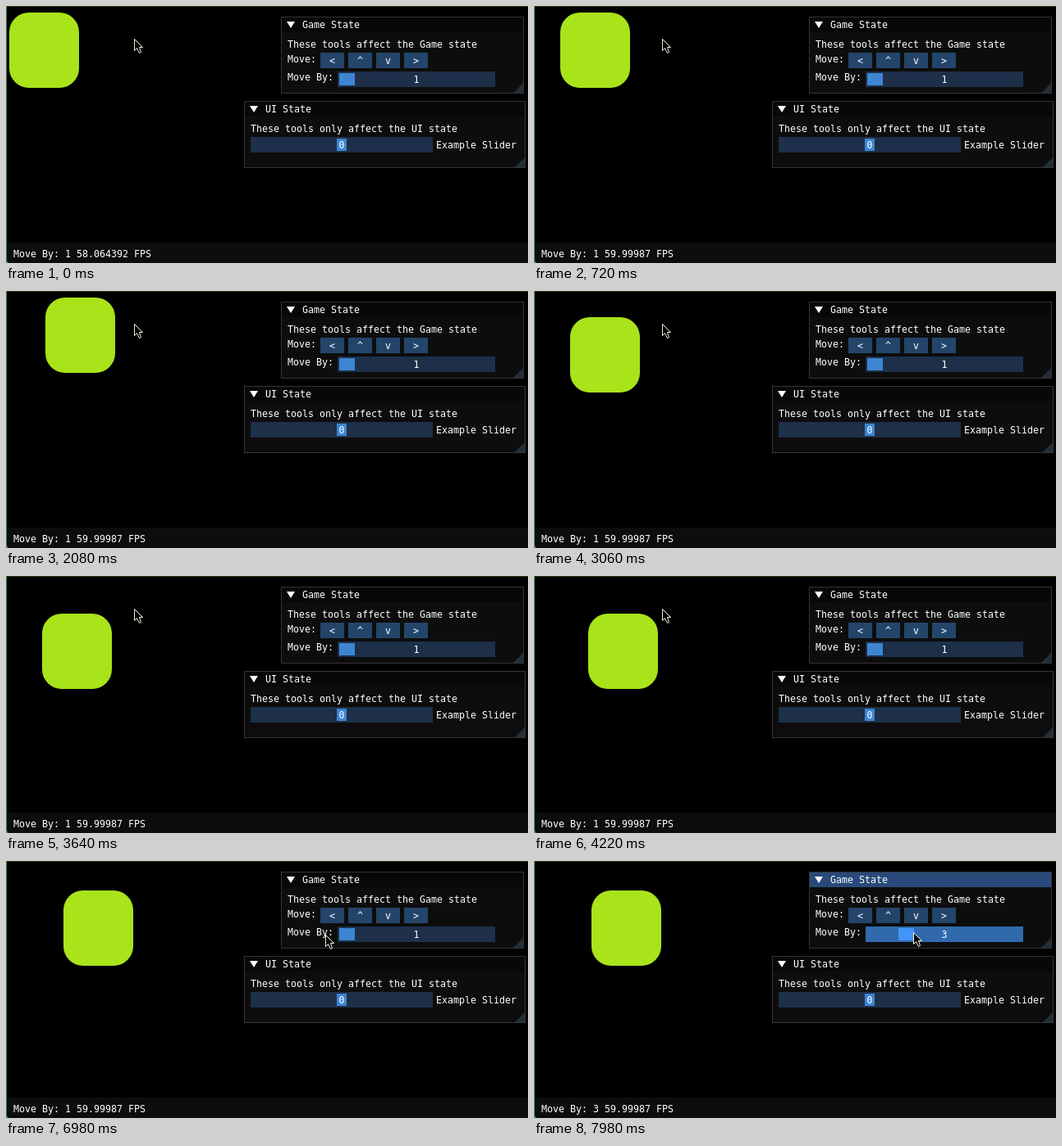
Write an HTML page with a canvas that moves like this. It is 636 px wide and 314 px high and loops after 8000 ms.

```html
<!DOCTYPE html>
<html lang="en">
<head>
<meta charset="utf-8">
<title>Game and UI state tools</title>
<style>
  html, body { margin: 0; width: 100%; height: 100%; overflow: hidden; background: #000; }
  canvas { display: block; }
</style>
</head>
<body>
<canvas id="stage" width="636" height="314"></canvas>
<script>
const ctx = document.getElementById('stage').getContext('2d');
const LOOP = 8000;
const PRESS_TICK = 163;
const FPS_TICK = 16;
const STEP = 18.8;
const color = {
  panel: '#0d0d0d', title: '#080808', activeTitle: '#294a7a', border: '#33333a',
  grip: '#222f38', button: '#23456a', track: '#1d2f49', hoveredTrack: '#23456a',
  activeTrack: '#316aac', grab: '#3d85d2', activeGrab: '#4296fa',
  player: '#a9e31a', edge: '#428c4e'
};

const clamp = (v, low, high) => Math.max(low, Math.min(high, v));

// Three game ticks per 140 ms: two short ones, then a long one.
function tickAt(ms) {
  const shifted = ms + 20;
  return 3 * Math.floor(shifted / 140) + Math.min(2, Math.floor(shifted % 140 / 20)) - 1;
}

// Distance covered while a key is held, at 2 px per tick.
const held = (tick, from, to) => 2 * (clamp(tick, from, to) - from);

function smooth(tick, from, to) {
  const u = clamp((tick - from) / (to - from), 0, 1);
  return u * u * (3 - 2 * u);
}

function playerAt(tick) {
  return [
    held(tick, 2, 34) - held(tick, 34, 46) + held(tick, 80, 93),
    held(tick, 50, 62) + held(tick, 70, 77) - held(tick, 91, 96)
  ];
}

function cursorAt(tick) {
  const drag = smooth(tick, PRESS_TICK, 171);
  return [
    Math.round(156 + 258 * smooth(tick, 121.5, 155.5) + 48 * drag),
    Math.round(40 + 50 * smooth(tick, 119, 139.5) - 3 * drag)
  ];
}

function rect(x, y, w, h, fill) {
  ctx.fillStyle = fill;
  ctx.fillRect(x, y, w, h);
}

function polygon(points, fill) {
  ctx.beginPath();
  points.forEach(([x, y]) => ctx.lineTo(x, y));
  ctx.closePath();
  ctx.fillStyle = fill;
  ctx.fill();
}

function text(string, x, baseline, align = 'left') {
  ctx.font = '11.63px "DejaVu Sans Mono", monospace';
  ctx.textAlign = align;
  ctx.fillStyle = '#fff';
  ctx.fillText(string, x, baseline);
}

function panel(x, y, w, h, title, titleFill) {
  rect(x, y, w, h, color.panel);
  rect(x, y, w, 19, titleFill);
  ctx.strokeStyle = color.border;
  ctx.lineWidth = 1;
  ctx.strokeRect(x + .5, y + .5, w - 1, h - 1);
  const right = x + w - 1, bottom = y + h - 1;
  polygon([[right, bottom - 12], [right, bottom], [right - 12, bottom]], color.grip);
  polygon([[x + 7, y + 6], [x + 17, y + 6], [x + 12, y + 14]], '#fff');
  text(title, x + 26, y + 14);
}

function slider(x, y, w, value, grabX, grabW, track, grab) {
  rect(x, y, w, 19, track);
  rect(grabX, y + 2, grabW, 15, grab);
  text(value, x + w / 2, y + 14, 'center');
}

function drawPlayer([x, y]) {
  ctx.fillStyle = color.player;
  ctx.beginPath();
  ctx.roundRect(4 + x, 8 + y, 85, 92, 24);
  ctx.fill();
}

function drawCursor([x, y]) {
  const outline = [[0, 0], [0, 14], [3, 11], [6, 17], [8, 16], [6, 10], [10, 10]];
  polygon(outline.map(([dx, dy]) => [x + dx + .5, y + dy + .5]), '#000');
  ctx.strokeStyle = '#f4f0dc';
  ctx.lineWidth = 1;
  ctx.stroke();
}

function drawGamePanel(moveBy, pressed, hovered) {
  panel(335, 13, 296, 94, 'Game State', pressed ? color.activeTitle : color.title);
  text('These tools affect the Game state', 343, 51);
  text('Move:', 343, 69);
  ['<', '^', 'v', '>'].forEach((label, i) => {
    rect(383 + 34 * i, 57, 29, 19, color.button);
    text(label, 397.5 + 34 * i, 71, 'center');
  });
  text('Move By:', 343, 91);
  const track = pressed ? color.activeTrack : hovered ? color.hoveredTrack : color.track;
  const grab = pressed ? color.activeGrab : color.grab;
  slider(404, 80, 192, moveBy, Math.round(406 + (moveBy - 1) * STEP), 19, track, grab);
}

function drawUiPanel() {
  panel(290, 116, 343, 82, 'UI State', color.title);
  text('These tools only affect the UI state', 298, 154);
  slider(298, 160, 222, 0, 403, 12, color.track, color.grab);
  text('Example Slider', 524, 174);
}

function draw(ms) {
  const tick = tickAt(ms);
  const cursor = cursorAt(tick);
  const pressed = tick >= PRESS_TICK;
  const hovered = cursor[0] >= 404 && cursor[1] >= 80;
  const moveBy = pressed ? 1 + Math.max(0, Math.round((cursor[0] - 415.4) / STEP)) : 1;
  const fps = tick < FPS_TICK ? '58.064392' : '59.99987';

  rect(0, 0, 636, 314, '#000');
  drawPlayer(playerAt(tick));
  drawGamePanel(moveBy, pressed, hovered);
  drawUiPanel();

  rect(0, 289, 636, 25, color.panel);
  text(`Move By: ${moveBy} ${fps} FPS`, 9, 307);

  rect(0, 0, 636, 1, '#2c3810');
  rect(0, 0, 1, 314, color.edge);
  polygon([[0, 310], [3, 314], [0, 314]], color.edge);
  drawCursor(cursor);
}

const start = performance.now();
function animate() {
  draw((performance.now() - start) % LOOP);
  requestAnimationFrame(animate);
}
animate();
</script>
</body>
</html>
```
